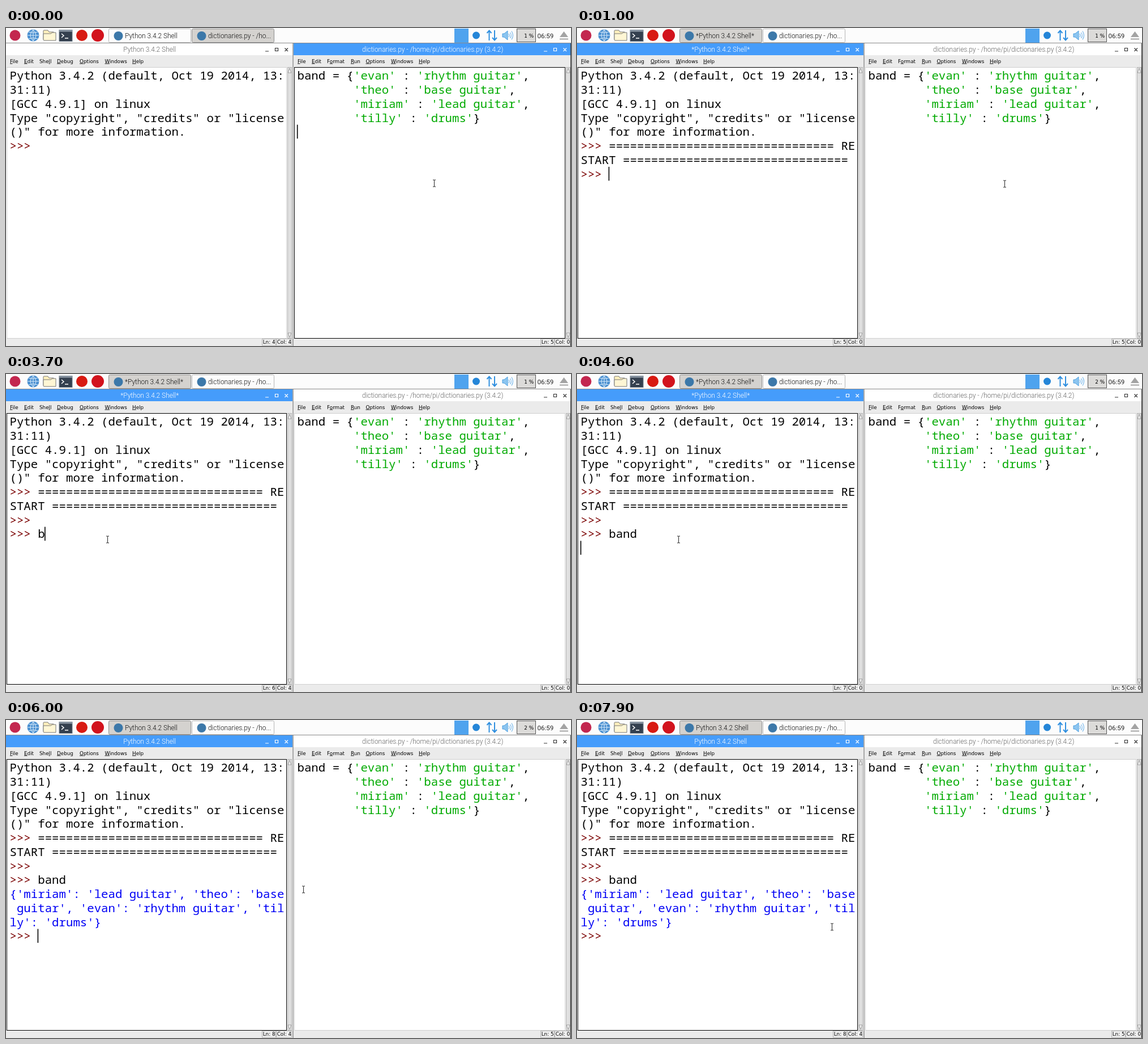
These frames come from a looping animation (998 by 561 pixels, 8 s). An HTML page:

```html
<!DOCTYPE html>
<html lang="en">
<head>
<meta charset="utf-8">
<title>Dictionaries in the shell</title>
<style>
  html, body { margin: 0; width: 100%; height: 100%; overflow: hidden; background: #fff; }
  svg { display: block; width: 998px; height: 561px; }
  text { white-space: pre; }
  .code { font: 20.72px "Noto Sans Mono", monospace; }
  .ui { font: 300 11.9px Roboto, sans-serif; }
  .menu { font: 8.8px "DejaVu Sans", sans-serif; fill: #000; }
  .key { text-decoration: underline; }
</style>
</head>
<body>
<svg id="stage" viewBox="0 0 998 561" xmlns="http://www.w3.org/2000/svg"></svg>
<script>
const NS = 'http://www.w3.org/2000/svg';
const stage = document.getElementById('stage');
const LOOP = 8000, STEP = 100;
const CHAR = 12.43, LINE = 24.75, TOP = 71.6, BASELINE = 91.3;
const LEFT_X = 6.5, RIGHT_X = 514.5;
const INK = '#000', GREEN = '#00aa00', RED = '#7a0000', BLUE = '#0000f5';
const ACTIVE = '#459cfb', PANEL = '#ebebeb';

function add(tag, attrs, parent = stage) {
  const node = document.createElementNS(NS, tag);
  for (const name in attrs) node.setAttribute(name, attrs[name]);
  parent.append(node);
  return node;
}
const rect = (x, y, width, height, fill, more) => add('rect', { x, y, width, height, fill, ...more });
const disc = (cx, cy, r, fill) => add('circle', { cx, cy, r, fill });
const path = (d, stroke, width = 1, fill = 'none') =>
  add('path', { d, stroke, fill, 'stroke-width': width });
function label(x, y, text, cls, more) {
  const node = add('text', { x, y, class: cls, ...more });
  node.textContent = text;
  return node;
}

// A line of code is a list of [text, colour] runs.
function codeLine(x, row, runs) {
  const node = add('text', { x, y: BASELINE + row * LINE, class: 'code' });
  for (const [text, fill] of runs) add('tspan', { fill }, node).textContent = text;
  return node;
}
const show = (node, on) => node.setAttribute('display', on ? 'inline' : 'none');

function drawPanel() {
  rect(0, 0, 998, 27, '#fcfcfc');
  disc(16, 13, 9.5, '#c3274f');

  disc(48, 13, 10.5, '#4a8fd0');
  path('M38 13H58M40 7Q48 10 56 7M40 19Q48 16 56 19M48 3V23M48 3Q38 13 48 23M48 3Q58 13 48 23', '#d9ecfb', 1);
  path('M66 20V5Q66 4 67 4H74L76 7H84V11', '#777', 1, '#fff0bd');
  path('M66 21V10H79L82 8H88V22H67Z', '#777', 1, '#fff6d4');
  rect(94, 3.5, 23, 20, '#34404f', { stroke: '#727e8b' });
  rect(94, 3.5, 23, 3, '#8b97a4');
  path('M98 10L102 13.5L98 17M104 18H110', '#fff', 1.5);
  disc(134, 13, 10, '#d81a12');
  disc(162, 13, 11, '#d2131d');

  rect(792, 1, 25, 25, '#4fa3ee');
  disc(830.5, 13, 6.5, '#2586d8');
  path('M853.5 22V5M849.5 9L853.5 4.5L857.5 9M863 4V21M859 17L863 21.5L867 17', '#2f8fdf', 2);
  path('M877 10H880L886 5V21L880 16H877Z', '#4b9ee0', 1, '#8cc5f0');
  path('M888 10Q890 13 888 16M890.5 8Q894 13 890.5 18M893 5.5Q898 13 893 20.5', '#79b9ec', 1.2);
  rect(902.5, 1.5, 33, 23, '#dcdbd9', { stroke: '#555' });
  label(938.5, 17.5, '06:59', 'ui', { fill: '#222', style: 'font-weight:400;font-size:11.6px' });
  path('M978 16L985.5 6L993 16ZM978 18.5H993V20.5H978Z', 'none', 0, '#a3a3a3');
  path('M0 26.5H998', '#8a8a8a');
}

function taskButton(x, width) {
  const box = rect(x, 1.5, width, 24, '#fff', { rx: 2 });
  disc(x + 17, 14, 8, '#3c78a9');
  const text = label(x + 28.5, 17.5, '', 'ui', { fill: '#111' });
  return (title, pressed) => {
    box.setAttribute('fill', pressed ? '#d4d2cf' : '#fcfcfc');
    box.setAttribute('stroke', pressed ? '#8f8f8f' : '#b4b4b4');
    text.textContent = title;
  };
}

// Menu names carry "_" before the underlined letter.
function drawMenu(items) {
  for (const [x, name] of items) {
    const [before, after] = name.split('_');
    const node = label(x, 61.5, before, 'menu');
    add('tspan', { class: 'key' }, node).textContent = after[0];
    add('tspan', {}, node).textContent = after.slice(1);
  }
}

function drawWindow(x, right, menu) {
  const bar = rect(x, 27, right - x, 21, '#fff');
  const title = label((x + right) / 2 + 0.7, 42, '', 'ui', { 'text-anchor': 'middle' });
  const r = right - 3;
  const buttons = path(
    `M${r - 45} 41H${r - 39}M${r - 27.5} 35.5h5v5h-5ZM${r - 10.5} 35.5l5.5 5.5m0 -5.5l-5.5 5.5`, '#333', 1.2);
  rect(x, 48, right - x, 22, PANEL);
  drawMenu(menu);

  const edge = right - 9;
  const field = rect(x + 1.5, 69.5, edge - x - 3, 478, '#fff');
  rect(edge + 0.5, 69.5, 7, 478, '#e0e0e0', { stroke: '#b0b0b0' });
  path(`M${edge + 1} 79l3 -8l3 8ZM${edge + 1} 538l3 8l3 -8Z`, '#8d8d8d', 0.8, '#efefef');

  rect(x, 548, right - x, 13, PANEL);
  rect(right - 53.5, 548.5, 24, 11.5, '#f0f0f0', { stroke: '#b5b5b5' });
  rect(right - 28.5, 548.5, 27, 11.5, '#f0f0f0', { stroke: '#b5b5b5' });
  const ln = label(right - 52.3, 557.3, '', 'menu');
  const col = label(right - 27.3, 557.3, '', 'menu');

  return (name, active, line, column) => {
    bar.setAttribute('fill', active ? ACTIVE : '#fff');
    title.setAttribute('fill', active ? '#fff' : '#666');
    title.textContent = name;
    buttons.setAttribute('stroke', active ? '#fff' : '#333');
    field.setAttribute('stroke', active ? '#000' : '#d0d0d0');
    ln.textContent = 'Ln: ' + line;
    col.textContent = 'Col: ' + column;
  };
}

drawPanel();
const shellTask = taskButton(181.5, 145);
const editorTask = taskButton(328.5, 145);
const cpu = label(932, 17, '', 'menu', { 'text-anchor': 'end' });

const shellWindow = drawWindow(0, 506, [[7, '_File'], [32, '_Edit'], [59, 'She_ll'],
  [90, '_Debug'], [130, '_Options'], [174.5, '_Windows'], [223, '_Help']]);
const editorWindow = drawWindow(508, 998, [[515, '_File'], [540, '_Edit'], [567, 'F_ormat'],
  [609, '_Run'], [635.5, '_Options'], [680, '_Windows'], [729, '_Help']]);
path('M507 27V561', '#a8a8a8', 2);
path('M997.5 27V561', '#333');

const players = [['evan', 'rhythm guitar'], ['theo', 'base guitar'],
  ['miriam', 'lead guitar'], ['tilly', 'drums']];
players.forEach(([name, part], row) => codeLine(RIGHT_X, row, [
  [row ? ' '.repeat(8) : 'band = {', INK], [`'${name}'`, GREEN], [' : ', INK],
  [`'${part}'`, GREEN], [row < 3 ? ',' : '}', INK]]));

['Python 3.4.2 (default, Oct 19 2014, 13:', '31:11)', '[GCC 4.9.1] on linux',
  'Type "copyright", "credits" or "license', '()" for more information.']
  .forEach((text, row) => codeLine(LEFT_X, row, [[text, INK]]));

const rule = '='.repeat(32);
const prompt = row => codeLine(LEFT_X, row, [['>>> ', RED]]);
prompt(5);
const restart = [
  codeLine(LEFT_X, 5, [['    ' + rule + ' RE', INK]]),
  codeLine(LEFT_X, 6, [['START ' + rule, INK]]),
  prompt(7)];
const secondPrompt = prompt(8);
const typed = codeLine(LEFT_X + 4 * CHAR, 8, [['', INK]]).firstChild;
const [first, second, third, fourth] = players;
const entry = ([name, part]) => `'${name}': '${part}'`;
const printed = '{' + [third, second, first, fourth].map(entry).join(', ') + '}';
const output = [0, 1, 2].map(i =>
  codeLine(LEFT_X, 9 + i, [[printed.slice(i * 39, i * 39 + 39), BLUE]]));
const lastPrompt = prompt(12);

const caret = rect(0, 0, 1.6, 24.5, '#000');
const pointer = path('M-2.5 -6H-.8L0 -5.2L.8 -6H2.5M0 -5.2V5.2M-2.5 6H-.8L0 5.2L.8 6H2.5', '#333', 1.1);

// Pointer stops: [time, x, y]; it eases between neighbours.
const stops = [[0, 756, 274], [400, 755, 275], [1300, 755, 275], [2100, 197, 299],
  [2200, 190, 298], [2300, 179, 292], [5100, 179, 292], [6000, 525, 299],
  [6900, 451, 364], [7100, 450, 365], [LOOP, 450, 365]];
function pointerAt(t) {
  const i = stops.findIndex(stop => stop[0] > t) - 1;
  const [t0, x0, y0] = stops[i], [t1, x1, y1] = stops[i + 1];
  const u = (t - t0) / (t1 - t0), k = u * u * (3 - 2 * u);
  return [x0 + (x1 - x0) * k, y0 + (y1 - y0) * k];
}

const lettersAt = t => Math.max(0, Math.min(4, Math.floor((t - 3700) / 100) + 1));

function cursorAt(t) {
  if (t < 1000) return [5, 4];
  if (t < 1200) return [7, 4];
  if (t < 4600) return [8, 4 + lettersAt(t)];
  if (t < 4700) return [9, 0];
  return t < 4800 ? [11, 13] : [12, 4];
}

function statusAt(t) {
  if (t < 1000) return [4, 4];
  if (t < 1200) return [5, 0];
  if (t < 4600) return [6, 4 + lettersAt(t - 100)];
  return t < 4800 ? [7, 0] : [8, 4];
}

function render(t) {
  const inShell = t >= 200;
  const busy = (t >= 1000 && t < 1200) || (t >= 3700 && t < 4800);
  const name = busy ? '*Python 3.4.2 Shell*' : 'Python 3.4.2 Shell';

  shellTask(name, inShell);
  editorTask('dictionaries.py - /ho...', !inShell);
  shellWindow(name, inShell, ...statusAt(t));
  editorWindow('dictionaries.py - /home/pi/dictionaries.py (3.4.2)', !inShell, 5, 0);
  cpu.textContent = (t < 1400 ? 1 : t < 2900 ? 14 : t < 4400 ? 1 : t < 7400 ? 2 : 1) + ' %';

  restart.forEach(node => show(node, t >= 1000));
  show(secondPrompt, t >= 1200);
  typed.textContent = 'band'.slice(0, lettersAt(t));
  output.forEach(node => show(node, t >= 4700));
  show(lastPrompt, t >= 4800);

  const [row, column] = inShell ? cursorAt(t) : [4, 0];
  caret.setAttribute('x', (inShell ? LEFT_X : RIGHT_X) + column * CHAR - 0.6);
  caret.setAttribute('y', TOP + row * LINE);
  show(caret, t < 1000 || (t - 1000) % 900 < 600);

  const [x, y] = pointerAt(t);
  pointer.setAttribute('transform', `translate(${Math.round(x) + 0.5} ${Math.round(y)})`);
}

const start = performance.now();
function tick() {
  const t = (performance.now() - start) % LOOP;
  render(Math.floor(t / STEP) * STEP);
  requestAnimationFrame(tick);
}
tick();
</script>
</body>
</html>
```
